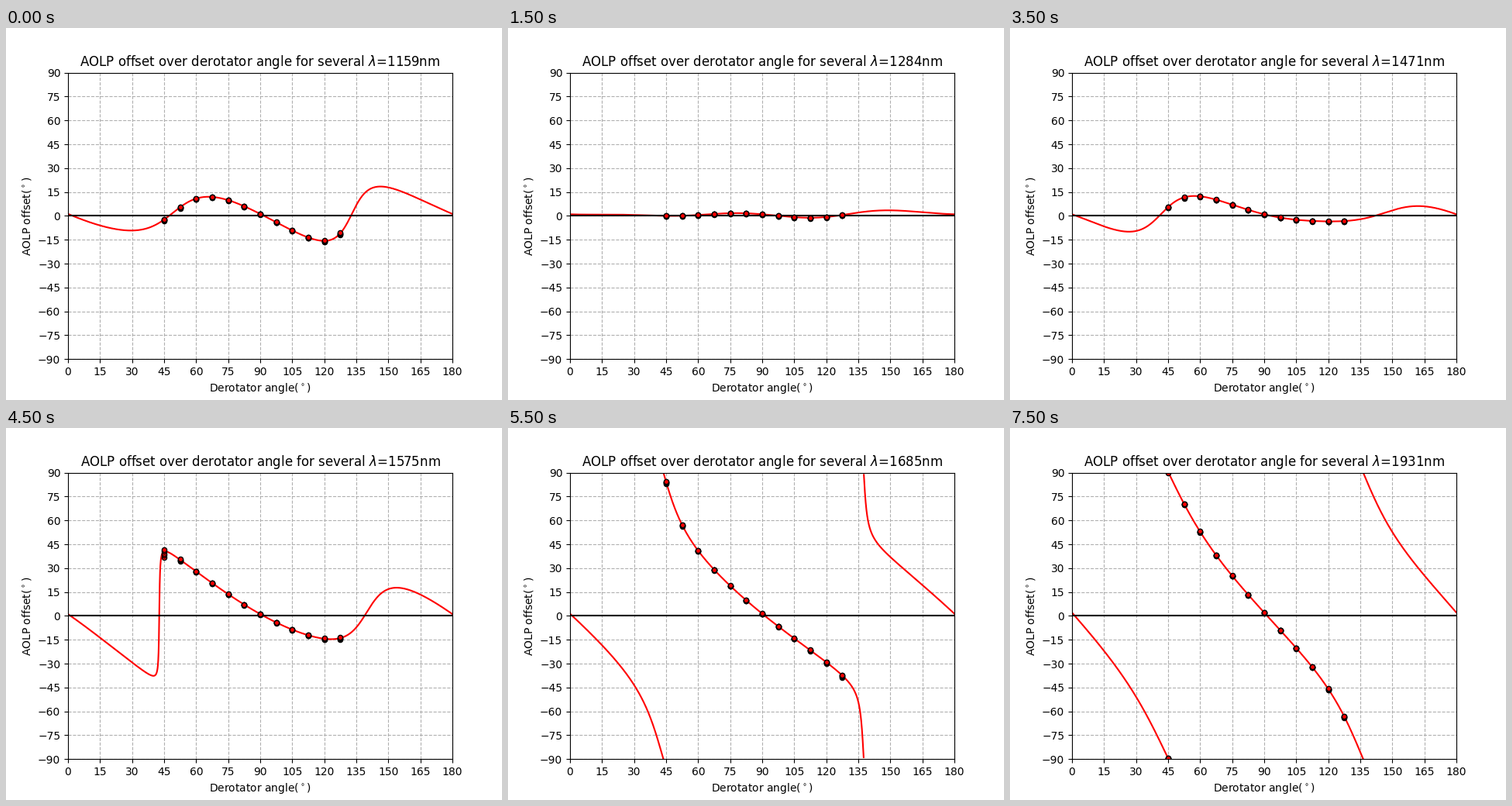
Animation, 640 px wide and 480 px high, one loop 8000 ms. Source, as a matplotlib script:

```python
import numpy as np
import matplotlib.pyplot as plt
from matplotlib.animation import FuncAnimation

FRAMES = 16
STEP_MS = 500
THETA = np.linspace(0, 180, 3601)
ANGLES = np.arange(45, 128, 7.5)
SCATTER = np.linspace(-.34, .12, 5)


def wavelength(i):
    """Logarithmically spaced channels (nm)."""
    return 1159.56 * (1931.8 / 1159.56) ** (i / (FRAMES - 1))


def retardance(i):
    """Derotator retardance relative to half wave (radians)."""
    keys = [0, 3, 7, 9, 11, 13, 15]
    degrees = [-67.8, -22.8, 53.6, 80.9, 99.7, 113, 120.7]
    return np.radians(np.interp(i, keys, degrees))


def crosstalk(i):
    """Leak of circular into linear polarisation."""
    return (.142 - .0006 * (i - 9.5) ** 2) - 1j * (.096 - .0008 * (i - 6.5) ** 2)


def response(theta, i):
    """Complex linear polarisation relative to an ideal derotator."""
    t = np.radians(theta)
    s, c = np.sin(2 * t), np.cos(2 * t)
    delta = retardance(i)
    direct = (c + 1j * np.cos(delta) * s) * np.exp(-2j * t)
    return direct + crosstalk(i) * np.sin(delta) * s * np.exp(-4j * t)


def offset(theta, i):
    base = .95 + .011 * (i - 5) ** 2
    return base + np.degrees(np.angle(response(theta, i))) / 2


def wrap(deg):
    return (deg + 90) % 180 - 90


def curve(i):
    y = wrap(offset(THETA, i))
    y[1:][np.abs(np.diff(y)) > 90] = np.nan
    return y


def points(i):
    # Low efficiency makes the measurements spread out
    spread = SCATTER[:, None] / np.abs(response(ANGLES, i))
    y = wrap(offset(ANGLES, i) + spread)
    x = np.broadcast_to(ANGLES, y.shape)
    return np.column_stack([x.ravel(), y.ravel()])


fig, ax = plt.subplots(figsize=(6.4, 4.8), dpi=100)
ax.set(xlim=(0, 180), ylim=(-90, 90),
       xticks=np.arange(0, 181, 15), yticks=np.arange(-90, 91, 15),
       xlabel=r"Derotator angle($^\circ$)", ylabel=r"AOLP offset($^\circ$)")
ax.grid(linestyle="--")
line, = ax.plot([], [], color="red", zorder=2.1)
ax.plot([0, 180], [0, 0], color="black", zorder=2.2)
dots = ax.scatter([], [], s=20, c="red", edgecolors="black", zorder=2.3)


def update(i):
    line.set_data(THETA, curve(i))
    dots.set_offsets(points(i))
    ax.set_title("AOLP offset over derotator angle for several "
                 rf"$\lambda$={int(wavelength(i))}nm")
    return line, dots


anim = FuncAnimation(fig, update, frames=FRAMES, interval=STEP_MS,
                     repeat=True, repeat_delay=0)
plt.show()
```
